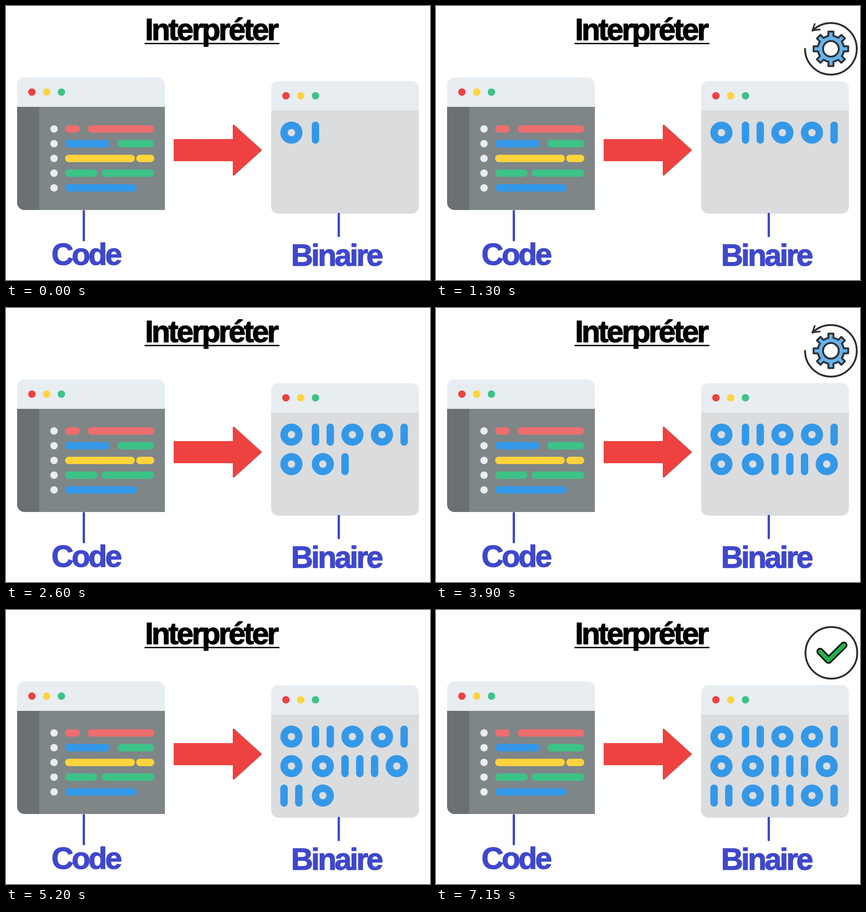
Animation, 918 px wide and 595 px high, one loop 7800 ms. Source, as an HTML page with a canvas:

```html
<!DOCTYPE html>
<html lang="fr">
<head>
<meta charset="utf-8">
<title>Interpréter</title>
<style>
html, body { margin: 0; width: 100%; height: 100%; overflow: hidden; background: #fff; }
canvas { display: block; }
</style>
</head>
<body>
<canvas id="stage" width="918" height="595"></canvas>
<script>
const ctx = document.getElementById('stage').getContext('2d');
const STEP = 650, STEPS = 12;
const RED = '#ed4240', YELLOW = '#ffd43b', GREEN = '#3dc287', BLUE = '#3498e8';
const PINK = '#ed6e6e', PALE = '#e8edf1', GROUND = '#dbdcde', INK = '#3f48cc', DARK = '#2f2f33';

// Each row appears in two parts, split at the space
const BITS = ['01 1001', '001 110', '110 1101'];

// Left bar colour and width, then the same for the right-aligned bar
const LINES = [
  [PINK, 32, PINK, 144],
  [BLUE, 96, GREEN, 80],
  [YELLOW, 151, YELLOW, 39],
  [GREEN, 70, GREEN, 114],
  [BLUE, 155]
];

function box(x, y, w, h, r, color) {
  ctx.fillStyle = color;
  ctx.beginPath();
  ctx.roundRect(x, y, w, h, r);
  ctx.fill();
}

function dot(x, y, r, color) {
  ctx.fillStyle = color;
  ctx.beginPath();
  ctx.arc(x, y, r, 0, Math.PI * 2);
  ctx.fill();
}

function trace(points) {
  ctx.beginPath();
  for (const [x, y] of points) ctx.lineTo(x, y);
}

function stroke(color, width) {
  ctx.strokeStyle = color;
  ctx.lineWidth = width;
  ctx.stroke();
}

function label(text, x, y, color) {
  ctx.font = 'bold 66px "Liberation Sans", Arial, sans-serif';
  ctx.letterSpacing = '-4px';
  ctx.textAlign = 'center';
  ctx.fillStyle = ctx.strokeStyle = color;
  ctx.lineWidth = 1.5;
  ctx.fillText(text, x, y);
  ctx.strokeText(text, x, y);
}

function header(x, y) {
  box(x, y, 320, 64, [16, 16, 0, 0], PALE);
  [RED, YELLOW, GREEN].forEach((c, i) => dot(x + 32 + i * 32, y + 32, 8, c));
}

function codeWindow() {
  header(24, 155);
  box(24, 219, 48, 224, [0, 0, 0, 16], '#6b7073');
  box(72, 219, 272, 224, 0, '#7f8688');
  LINES.forEach(([leftColor, left, rightColor, right], i) => {
    const y = 259 + i * 32;
    dot(104, y + 8, 8, PALE);
    box(128, y, left, 16, 8, leftColor);
    if (right) box(321 - right, y, right, 16, 8, rightColor);
  });
}

// A zero takes two cells of 32 px, a one takes one
function bitRow(bits, y) {
  let x = 0;
  for (const bit of bits) {
    const left = x + (x < 64 ? 594 : 598);
    if (bit === '0') {
      dot(left + 24, y + 24, 24, BLUE);
      dot(left + 24, y + 24, 8, GROUND);
      x += 64;
    } else {
      box(left, y, 16, 48, 8, BLUE);
      x += 32;
    }
  }
}

function binaryWindow(row, phase) {
  header(574, 163);
  box(574, 227, 320, 224, [0, 0, 16, 16], GROUND);
  for (let i = 0; i <= row; i++) {
    const [first, rest] = BITS[i].split(' ');
    bitRow(i === row && phase === 0 ? first : first + rest, 251 + i * 64);
  }
}

function arrow() {
  const top = [[363, 289], [491, 289], [491, 258], [494, 258]];
  const bottom = top.map(([x, y]) => [x, 626 - y]).reverse();
  trace([...top, [554.5, 313], ...bottom]);
  ctx.fillStyle = RED;
  ctx.fill();
}

function gear() {
  ctx.beginPath();
  ctx.arc(0, 0, 56, Math.PI, -2.36, true);
  stroke(DARK, 4);
  trace([[-35, -54], [-40, -40], [-24, -42]]);
  stroke(DARK, 3.5);

  const body = 28.5, tip = 37.5, half = 5.5, a = Math.asin(half / body);
  ctx.beginPath();
  for (let i = 0; i < 8; i++) {
    const t = i * Math.PI / 4, c = Math.cos(t), s = Math.sin(t);
    ctx.lineTo(tip * c + half * s, tip * s - half * c);
    ctx.lineTo(tip * c - half * s, tip * s + half * c);
    ctx.arc(0, 0, body, t + a, t + Math.PI / 4 - a);
  }
  ctx.closePath();
  ctx.fillStyle = '#65b2ea';
  ctx.fill();
  stroke(DARK, 4);
  dot(0, 0, 17, '#fff');
  stroke(DARK, 4);
}

function check() {
  ctx.beginPath();
  ctx.arc(0, 0, 56, 0, Math.PI * 2);
  stroke(DARK, 4);
  trace([[-24.5, -3], [-6, 16], [27, -16.5]]);
  stroke('#000', 15.5);
  stroke('#22b14c', 9);
}

function draw(step) {
  const row = Math.floor(step / 4), phase = step % 4;
  ctx.fillStyle = '#fff';
  ctx.fillRect(0, 0, 918, 595);
  ctx.lineCap = ctx.lineJoin = 'round';

  label('Interpréter', 444, 74, '#000');
  box(300, 80, 292, 3, 0, '#000');
  codeWindow();
  binaryWindow(row, phase);
  arrow();
  box(166, 443, 5, 68, 2.5, INK);
  box(718, 449, 5, 53, 2.5, INK);
  label('Code', 173, 562, INK);
  label('Binaire', 715, 564, INK);

  ctx.save();
  ctx.translate(row < 2 ? 855 : 856, 93);
  if (phase === 2) gear();
  if (phase === 3) check();
  ctx.restore();
}

function tick() {
  draw(Math.floor(performance.now() / STEP) % STEPS);
  requestAnimationFrame(tick);
}
tick();
</script>
</body>
</html>
```
